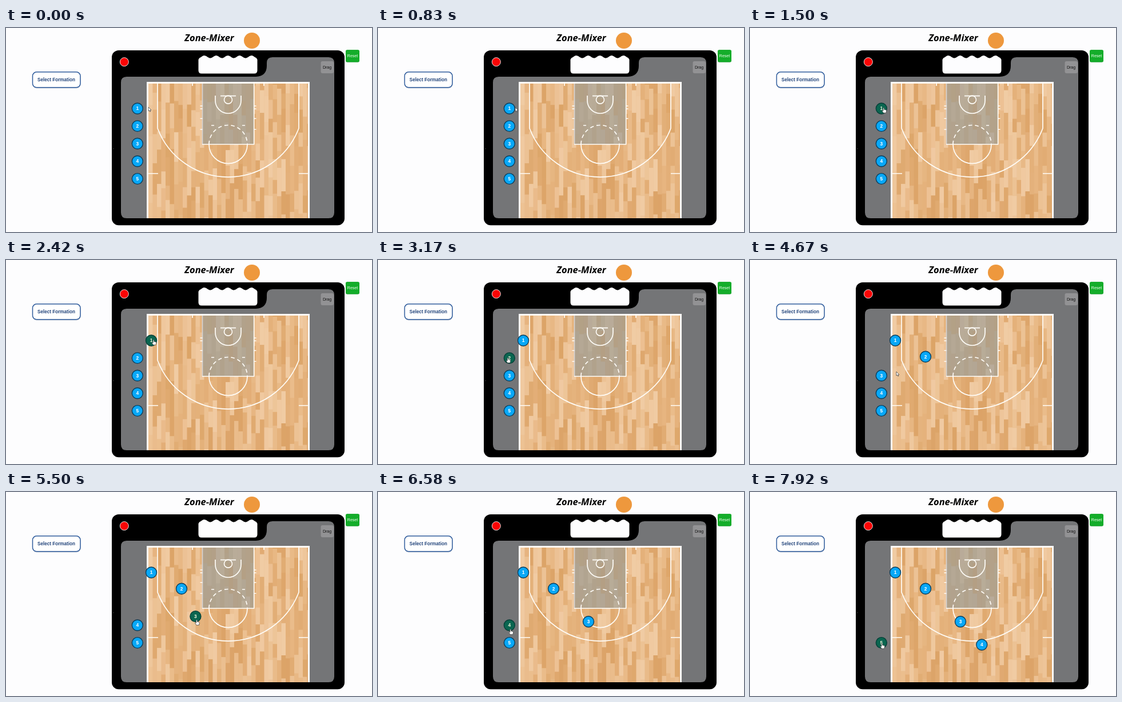
An HTML page that plays this animation: 640x356 px, repeating every 8 s.

```html
<!DOCTYPE html>
<html lang="en">
<head>
<meta charset="utf-8">
<title>Court board</title>
<style>
  html, body { margin: 0; width: 100%; height: 100%; overflow: hidden; background: #fdfdfe; }
  svg { display: block; width: 100vw; height: 100vh; }
  text { font-family: "Liberation Sans", Arial, sans-serif; text-anchor: middle; }
  .title { font: italic 700 16.4px "Noto Sans", "Open Sans", sans-serif; }
  .bold { font-weight: 700; }
  .lines { fill: none; stroke: #fffdf8; stroke-width: 1.7; }
  .token circle { fill: #08a8f7; stroke: #0b3f5e; stroke-width: 1.4; }
  .token text { fill: #fff; font-size: 8.4px; font-weight: 700; }
  .token.hot circle { fill: #0a6650; stroke: #073f38; }
  .token.hot text { fill: #eef3d8; }
  .pointer { fill: #fff; stroke: #333; stroke-width: .7; stroke-linejoin: round; }
</style>
</head>
<body>
<svg viewBox="0 0 640 356">
  <rect width="640" height="356" fill="#fdfdfe"/>
  <text class="title" x="355.5" y="23">Zone-Mixer</text>
  <circle cx="430" cy="22" r="14" fill="#ee983d"/>

  <rect x="46.5" y="78" width="84" height="27.5" rx="7" fill="#d3d7df"/>
  <rect x="46.5" y="76.8" width="83.5" height="27" rx="7" fill="#fff" stroke="#2f5c9c" stroke-width="1.5"/>
  <text class="bold" x="88" y="93" font-size="8.15" fill="#24467c">Select Formation</text>

  <rect x="185" y="39" width="407" height="305.2" rx="12"/>
  <circle cx="188" cy="210.5" r=".8" fill="#333"/>
  <circle cx="206.8" cy="59.2" r="7.5" fill="#fa0404" stroke="#f3e4e4"/>
  <path id="handle" fill="#fdfdfe"/>
  <path d="M201 95q0-10 10-10H437Q456 84 456 66V61q0-10 10-10H564q10 0 10 10V322q0 10-10 10H211q-10 0-10-10Z" fill="#747577"/>

  <rect x="594" y="38.3" width="24" height="21.5" rx="3" fill="#119426"/>
  <rect x="594" y="38.3" width="24" height="20.7" rx="3" fill="#14ad2a"/>
  <text x="606" y="50.5" font-size="7" fill="#f0fff0">Reset</text>
  <rect x="550.5" y="58" width="22.5" height="21" rx="3" fill="#929294"/>
  <text x="561.5" y="71" font-size="7" fill="#111">Drag</text>

  <rect x="246" y="94" width="285" height="238" fill="#e8b885"/>
  <g id="floor"></g>
  <rect x="343.5" y="97" width="90" height="106" fill="#b0a491"/>
  <g id="paint"></g>
  <g class="lines">
    <path d="M247.5 332V95.5H529.5V332" stroke-width="3"/>
    <path d="M343.5 97V203" stroke="#d5d2d2"/>
    <path d="M343 203H434.5M433.7 97V203"/>
    <path d="M265 97V175A132.2 132.2 0 0 0 512 175V97"/>
    <path d="M249 254H266M512 254H528M326 97v4M451 97v4"/>
    <path d="M375 118.5H402"/>
    <circle cx="388.5" cy="125.2" r="7"/>
    <path d="M366 118V126.5A22.5 22.5 0 0 0 411 126.5V118"/>
    <path d="M355 203A33.5 33.5 0 0 0 422 203"/>
    <path d="M355 203A33.5 33.5 0 0 1 422 203" stroke-dasharray="6.5 5"/>
    <path d="M359 170h5M413 170h5"/>
    <path d="M339.5 136h4m0 5h-4m0 17h4m0 19h-4M434 136h3.5m0 5h-3.5m0 17h3.5m0 19h-3.5"/>
  </g>

  <g id="tokens"></g>
  <path id="arrow" class="pointer" d="M0 0V7L1.7 5.6L2.8 8L4 7.5L3 5.2H5Z"/>
  <path id="hand" class="pointer" d="M-.9.6Q0-.6.9.6V3.2L4 4Q5 4.3 4.8 5.5L4 9.2H-.4L-3 5.7Q-2.8 4.4-.9 5.6Z"/>
</svg>
<script>
const LOOP = 8000, FPS = 12;
const $ = id => document.getElementById(id);

function add(parent, tag, attrs, text) {
  const el = document.createElementNS(parent.namespaceURI, tag);
  for (const key in attrs) el.setAttribute(key, attrs[key]);
  if (text) el.textContent = text;
  parent.appendChild(el);
  return el;
}

let seed = 41;
function random() {
  seed = (seed * 16807) % 2147483647;
  return seed / 2147483647;
}

// Vertical boards of random length, slightly lighter or darker than the ground
function layPlanks(group, left, top, right, bottom, contrast) {
  const step = 7.5;
  for (let x = left; x < right; x += step) {
    let y = top - random() * 30;
    while (y < bottom) {
      const end = y + 22 + random() * 40, from = Math.max(y, top);
      const shade = random() * 2 - 1;
      if (end > from) add(group, "rect", {
        x, y: from, width: Math.min(step, right - x),
        height: Math.min(end, bottom) - from,
        fill: shade > 0 ? "#fbe6cf" : "#c9853c",
        opacity: Math.abs(shade) * contrast
      });
      y = end;
    }
  }
}
layPlanks($("floor"), 249, 97, 528, 332, .42);
layPlanks($("paint"), 344.5, 97, 433, 202, .15);

// Grip with a wavy upper edge
function handlePath() {
  const left = 336.5, right = 439.5, bumps = 5;
  let d = `M${left} 74V55`;
  for (let x = left + 2; x <= right - 2; x++) {
    const phase = (x - left) / (right - left) * bumps * 2 * Math.PI;
    d += `L${x} ${50.3 + 2.2 * Math.cos(phase)}`;
  }
  return d + `L${right} 55V74q0 5.5-5.5 5.5H${left + 5.5}q-5.5 0-5.5-5.5Z`;
}
$("handle").setAttribute("d", handlePath());

const mix = (a, b, k) => a.map((v, i) => v + (b[i] - v) * k);
const plus = (a, b) => [a[0] + b[0], a[1] + b[1]];
function ease(t, from, to) {
  const k = Math.min(1, Math.max(0, (t - from) / (to - from)));
  return k * k * (3 - 2 * k);
}

// Each play: when a token is taken and let go, where it lands, where it is held
const plays = [
  { grab: 1600, drop: 2400, spot: [254, 140.5], grip: [4, -1.5] },
  { grab: 3400, drop: 4290, spot: [307, 168.7], grip: [-5, 1.5] },
  { grab: 4950, drop: 5780, spot: [368, 226.3], grip: [2, 6] },
  { grab: 6670, drop: 7320, spot: [405.3, 266.5], grip: [2, 7] },
  { grab: LOOP, drop: LOOP + 1, spot: [230, 263], grip: [1, 1] }
];
const START = [249, 138], HOLD = 110, LIFT = 3.5;

plays.forEach((play, i) => {
  play.home = [229.8, 140.5 + 30.65 * i];
  play.el = add($("tokens"), "g", { class: "token" });
  add(play.el, "circle", { r: 9.5 });
  add(play.el, "text", { y: 2.9 }, String(i + 1));
});

function tokenAt({ home, spot, grab, drop }, t) {
  const k = ease(t, grab, drop);
  const [x, y] = mix(home, spot, k);
  return [x, y - LIFT * 4 * k * (1 - k) * Math.min(1, Math.abs(spot[0] - home[0]) / 70)];
}

function pointerAt(t) {
  const i = plays.findIndex(play => t <= play.drop);
  const play = plays[i], last = plays[i - 1];
  if (t >= play.grab) return plus(tokenAt(play, t), play.grip);
  const from = last ? plus(last.spot, last.grip) : START;
  const leave = last ? last.drop + HOLD : 0;
  return mix(from, plus(play.home, play.grip), ease(t, leave, play.grab - HOLD));
}

const place = (el, [x, y]) => el.setAttribute("transform", `translate(${x} ${y})`);

function render(time) {
  const t = Math.floor((time % LOOP) * FPS / 1000 + .06) * 1000 / FPS;
  const tip = pointerAt(t);
  let over = false;
  for (const play of plays) {
    const [x, y] = tokenAt(play, t);
    const hot = Math.hypot(tip[0] - x, tip[1] - y) < 10.2;
    place(play.el, [x, y]);
    play.el.classList.toggle("hot", hot);
    over = over || hot;
  }
  for (const id of ["arrow", "hand"]) {
    place($(id), tip);
    $(id).style.display = (id === "hand") === over ? "" : "none";
  }
}

function tick() {
  render(performance.now());
  requestAnimationFrame(tick);
}
tick();
</script>
</body>
</html>
```
